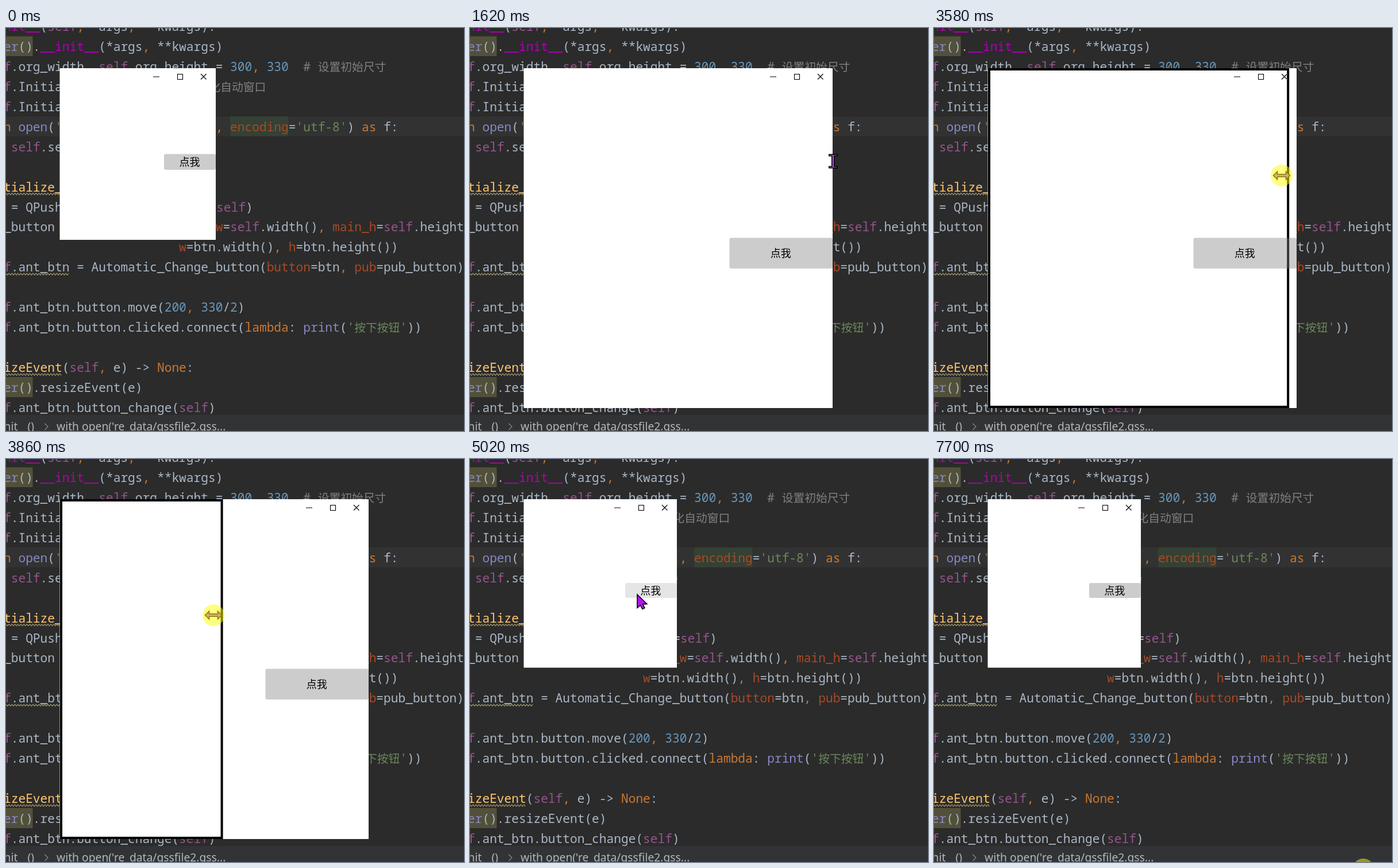
Write an HTML page with a canvas that moves like this. It is 797 by 702 pixels and loops after 7770 ms.

```html
<!DOCTYPE html>
<html lang="zh">
<head>
<meta charset="utf-8">
<title>Resizable button demo</title>
<style>
html, body { margin: 0; width: 100%; height: 100%; overflow: hidden; background: #2b2b2b; }
canvas { display: block; }
</style>
</head>
<body>
<canvas id="stage" width="797" height="702"></canvas>
<script>
const ctx = document.getElementById('stage').getContext('2d');
const W = 797, H = 702, LOOP = 7770;
const CODE = '21.2px "Noto Sans Mono", monospace';
const HAN = '"Noto Sans CJK SC", "Noto Sans CJK", sans-serif';
const ROW = 34.94, LEFT = -4;

const COLORS = {
  t: '#a9b7c6', o: '#cc7832', p: '#94558d', m: '#b200b2', b: '#8888c6',
  n: '#6897bb', s: '#6a8759', k: '#aa4926', y: '#ffc66d', c: '#808080'
};

// Rows of code with colour marks; the first one is cut by the top edge.
const LINES = [
  '{m}nit__{t}({p}self{o}, {t}*args{o}, {t}**kwargs):',
  '{b}er{t}().{m}__init__{t}(*args{o}, {t}**kwargs)',
  '{p}f{t}.org_width{o}, {p}self{t}.org_height = {n}300{o}, {n}330  {c}# 设置初始尺寸',
  '{p}f{t}.Initialize_window()  {c}# 初始化自动窗口',
  '{p}f{t}.Initialize_button()',
  "{o}h {b}open{t}({s}'re_data/qssfile2.qss'{o}, {k}encoding{t}={s}'utf-8'{t}) {o}as {t}f:",
  ' {p}self{t}.setStyleSheet(f.read())',
  '',
  '{y}tialize_button{t}({p}self{t}):',
  "{t} = QPushButton({s}'点我'{o}, {k}parent{t}={p}self{t})",
  '{t}_button = Public_button({k}main_w{t}={p}self{t}.width(){o}, {k}main_h{t}={p}self{t}.height()',
  '                        {k}w{t}=btn.width(){o}, {k}h{t}=btn.height())',
  '{p}f{t}.ant_btn = Automatic_Change_button({k}button{t}=btn{o}, {k}pub{t}=pub_button)',
  '',
  '{p}f{t}.ant_btn.button.move({n}200{o}, {n}330{t}/{n}2{t})',
  "{p}f{t}.ant_btn.button.clicked.connect({o}lambda{t}: {b}print{t}({s}'按下按钮'{t}))",
  '',
  '{y}izeEvent{t}({p}self{o}, {t}e) -> {o}None{t}:',
  '{b}er{t}().resizeEvent(e)',
  '{p}f{t}.ant_btn.button_change({p}self{t})'
];

// Bursts of movement: start, end, number of steps.
const RUNS = [[0, 0, 1], [70, 740, 11], [1070, 1620, 8], [1820, 2100, 5], [2300, 2370, 2],
  [2630, 2970, 5], [3170, 3240, 2], [3510, 4280, 12], [4350, 4350, 1], [4550, 5300, 10],
  [5370, 5720, 6], [6050, 6810, 12], [6880, 7370, 8], [7700, 7700, 1]];

// Pointer path: time, x, y, shape (I beam, H resize, A arrow).
const PATH = [
  [0, 800, 760, 'I'], [70, 715, 637, 'I'], [270, 560, 400, 'I'], [470, 400, 187, 'I'],
  [600, 358, 215, 'H'], [740, 362, 232, 'H'],
  [1070, 365, 232, 'H'], [1149, 385, 232, 'H'], [1384, 570, 232, 'H'], [1541, 629, 232, 'H'],
  [1620, 632, 232, 'I'],
  [1820, 632, 238, 'I'], [2030, 624, 274, 'H'], [2100, 622, 276, 'H'],
  [2300, 629, 272, 'H'], [2370, 633, 268, 'I'],
  [2630, 632, 264, 'I'], [2970, 637, 253, 'I'],
  [3170, 632, 255, 'H'], [3240, 628, 257, 'H'],
  [3510, 628, 257, 'H'], [3580, 605, 257, 'H'], [3650, 540, 260, 'H'], [3790, 390, 271, 'H'],
  [3860, 361, 272, 'H'], [3930, 358, 272, 'H'],
  [4000, 352, 270, 'A'], [4280, 312, 254, 'A'], [4350, 306, 236, 'A'],
  [4550, 304, 226, 'A'], [4720, 300, 194, 'A'], [4960, 291, 235, 'A'], [5040, 291, 235, 'A'],
  [5300, 303, 212, 'A'], [5370, 306, 196, 'A'], [5440, 308, 191, 'A'], [5650, 312, 237, 'A'],
  [5720, 314, 234, 'A'],
  [6050, 322, 228, 'A'], [6257, 349, 211, 'A'], [6320, 368, 177, 'I'], [6400, 440, 215, 'I'],
  [6600, 575, 409, 'I'], [6810, 420, 366, 'I'],
  [6880, 430, 380, 'I'], [7160, 620, 560, 'I'], [7300, 739, 680, 'I'], [7370, 747, 722, 'I'],
  [7700, 747, 715, 'H']
];

// Mouse button held: from, to, and whether it drags the window edge.
const PRESSES = [[1070, 1615, true], [3510, 3925, true], [7700, LOOP, false]];

const LAYOUTS = {
  start: { right: 365, bottom: 369, btn: [275, 219.5, 90, 27.5] },
  large: { right: 631, bottom: 662, btn: [451.5, 365.5, 179.5, 53.5] },
  small: { right: 360, bottom: 363.5, btn: [270, 216, 89.5, 26] }
};
const WIN_X = 93.5, WIN_Y = 70;

const baseline = i => 40 + ROW * i;

function rect(color, x, y, w, h) {
  ctx.fillStyle = color;
  ctx.fillRect(x, y, w, h);
}

function drawCode(src, row) {
  let x = LEFT;
  const parts = src.split(/\{(\w)\}/);
  for (let i = 0; i < parts.length; i += 2) {
    ctx.fillStyle = COLORS[parts[i - 1] || 't'];
    for (const run of parts[i].split(/([\u4e00-\u9fff]+)/)) {
      ctx.font = /[\u4e00-\u9fff]/.test(run) ? '300 19.8px ' + HAN : CODE;
      ctx.fillText(run, x, baseline(row));
      x += ctx.measureText(run).width;
    }
  }
}

function drawWave(row, end) {
  const y = baseline(row) + 4.5;
  ctx.beginPath();
  for (let x = 0, k = 0; x <= end; x += 2.6, k++) ctx.lineTo(x, y + (k % 2 ? 1.5 : -1.5));
  ctx.strokeStyle = '#a59c6c';
  ctx.lineWidth = 1.1;
  ctx.stroke();
}

function drawEditor() {
  rect('#2b2b2b', 0, 0, W, H);
  rect('#323232', 0, 154, W, 34.5);
  rect('#344134', 390, 154, 101.5, 34.5);
  rect('#52503a', 0, 14.5, 46.5, 34.5);
  rect('#52503a', 0, 608, 46.5, 35);
  ctx.textAlign = 'left';
  ctx.textBaseline = 'alphabetic';
  LINES.forEach((line, i) => drawCode(line, i - 1));
  drawWave(7, 100);
  drawWave(11, 110);
  drawWave(16, 97);

  rect('#313335', 0, 674, W, 28);
  ctx.font = '19.3px "Noto Sans", sans-serif';
  ctx.fillStyle = '#b4b8bb';
  ctx.fillText('nit__()', -3.5, 701);
  ctx.fillText("with open('re_data/qssfile2.qss...", 88, 701);
  ctx.strokeStyle = '#85888a';
  ctx.lineWidth = 1.3;
  ctx.beginPath();
  ctx.moveTo(67.5, 689);
  ctx.lineTo(73, 694.5);
  ctx.lineTo(67.5, 700);
  ctx.stroke();
}

function drawWindow({ right, bottom, btn }, hover) {
  rect('#fff', WIN_X, WIN_Y, right - WIN_X, bottom - WIN_Y);
  rect('#000', right - 109, 84.5, 11, 1);
  ctx.strokeStyle = '#000';
  ctx.lineWidth = 1.1;
  ctx.strokeRect(right - 66.5, 80.5, 9, 9);
  ctx.beginPath();
  ctx.moveTo(right - 26, 80);
  ctx.lineTo(right - 16.5, 89.5);
  ctx.moveTo(right - 16.5, 80);
  ctx.lineTo(right - 26, 89.5);
  ctx.stroke();

  const [x, y, w, h] = btn;
  ctx.fillStyle = hover ? '#e5e5e5' : '#ccc';
  ctx.beginPath();
  ctx.roundRect(x, y, w, h, 3);
  ctx.fill();
  ctx.fillStyle = '#000';
  ctx.font = '300 18px ' + HAN;
  ctx.textAlign = 'center';
  ctx.fillText('点我', x + w / 2 - 0.5, y + h / 2 + 7);
}

// The resize frame inverts whatever lies below it.
function drawFrame(right, bottom) {
  ctx.save();
  ctx.globalCompositeOperation = 'difference';
  ctx.strokeStyle = '#fff';
  ctx.lineWidth = 4;
  ctx.strokeRect(96, 72, right - 98, bottom - 74);
  ctx.restore();
}

function polygon(pts, fill) {
  ctx.beginPath();
  pts.forEach(([x, y]) => ctx.lineTo(x, y));
  ctx.closePath();
  ctx.fillStyle = fill;
  ctx.fill();
  ctx.strokeStyle = '#000';
  ctx.lineWidth = 1.5;
  ctx.stroke();
}

const SHAPES = {
  A: () => polygon([[0, 1], [0, 24.5], [5.5, 20], [9, 26.5], [13, 24.5], [10, 18], [17, 17.5]], '#b414ee'),
  H: () => polygon([[-14.5, 0], [-7.5, -7], [-7.5, -2.2], [7.5, -2.2], [7.5, -7], [14.5, 0],
    [7.5, 7], [7.5, 2.2], [-7.5, 2.2], [-7.5, 7]], '#c455e6'),
  I() {
    for (const y of [-12.5, 8.5]) rect('#000', -8, y, 16, 4);
    rect('#000', -3, -11, 5.5, 22);
    for (const y of [-11, 10]) rect('#b04ad0', -6.5, y, 13, 1);
    rect('#c455e6', -1.3, -10, 2.2, 20);
  }
};

// Motion is stepped: the latest step of the current burst holds.
function snap(t) {
  const [start, end, n] = RUNS.findLast(r => r[0] <= t);
  const step = n > 1 ? (end - start) / (n - 1) : 1;
  return start + Math.min(n - 1, Math.floor((t - start) / step + 0.01)) * step;
}

function pointer(t) {
  const i = PATH.findLastIndex(p => p[0] <= t + 0.5);
  const a = PATH[i], b = PATH[i + 1] || a;
  const k = b === a ? 0 : Math.max(0, (t - a[0]) / (b[0] - a[0]));
  return { x: a[1] + (b[1] - a[1]) * k, y: a[2] + (b[2] - a[2]) * k, shape: a[3] };
}

function draw(time) {
  const t = snap(time);
  const p = pointer(t);
  const press = PRESSES.find(([from, to]) => t >= from && t < to);
  const win = t < PRESSES[0][1] ? LAYOUTS.start : t < PRESSES[1][1] ? LAYOUTS.large : LAYOUTS.small;
  const [bx, by, bw, bh] = win.btn;
  const hover = p.shape === 'A' && p.x >= bx && p.x <= bx + bw && p.y >= by && p.y <= by + bh;

  drawEditor();
  drawWindow(win, hover);
  // The frame trails the pointer a little.
  if (press && press[2]) drawFrame(pointer(Math.max(t - 40, press[0])).x, win.bottom);

  ctx.save();
  ctx.translate(p.x, p.y);
  SHAPES[p.shape]();
  if (press) {
    ctx.fillStyle = 'rgba(255,255,0,0.5)';
    ctx.beginPath();
    ctx.arc(0, 0, 19, 0, Math.PI * 2);
    ctx.fill();
  }
  ctx.restore();
}

const begin = performance.now();
function tick() {
  draw((performance.now() - begin) % LOOP);
  requestAnimationFrame(tick);
}
tick();
</script>
</body>
</html>
```
